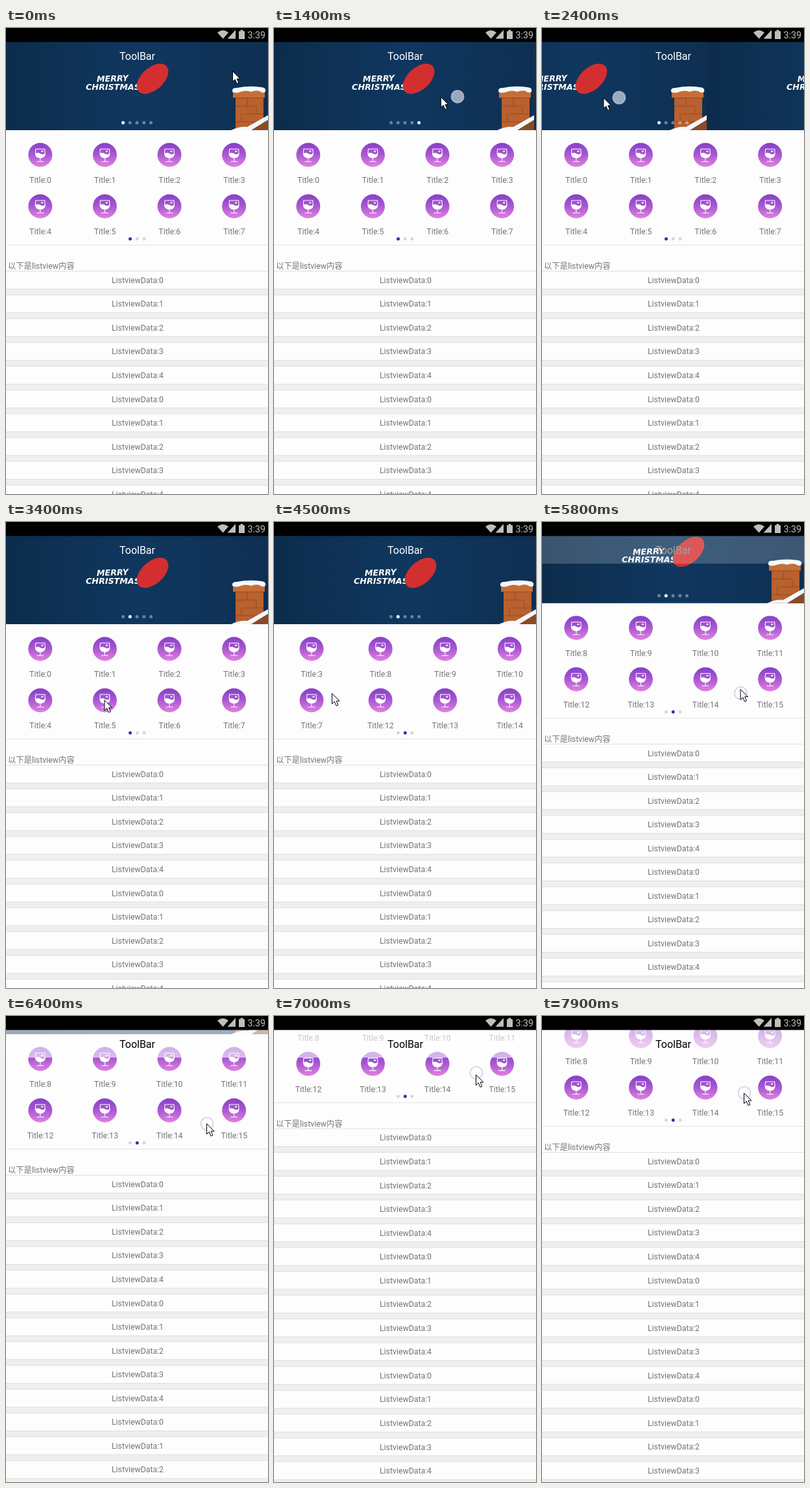
An HTML page that plays this animation: 404x716 px, repeating every 8000 ms.

```html
<!DOCTYPE html>
<html lang="zh">
<head>
<meta charset="utf-8">
<title>ToolBar</title>
<style>
  html, body { margin: 0; width: 100%; height: 100%; overflow: hidden; background: #fdfdfd; }
  svg { display: block; width: 404px; height: 716px; }
  text { font-family: Roboto, "Noto Sans CJK SC", "Noto Sans CJK", sans-serif; font-size: 12.3px; fill: #757575; }
  .mid { text-anchor: middle; }
  .bar { font-size: 16px; }
  .clock { font-size: 14.3px; fill: #bebebe; }
  .greet { font-family: "DejaVu Sans", sans-serif; font-weight: bold; font-style: italic; font-size: 12.7px; fill: #fff; }
</style>
</head>
<body>
<svg viewBox="0 0 404 716">
  <defs>
    <linearGradient id="violet" x2="0" y2="1">
      <stop stop-color="#8640c8"/><stop offset=".45" stop-color="#a555d0"/><stop offset="1" stop-color="#e082e0"/>
    </linearGradient>
    <linearGradient id="night">
      <stop stop-color="#0c2c4c"/><stop offset=".5" stop-color="#10375f"/><stop offset="1" stop-color="#0e2f52"/>
    </linearGradient>
    <g id="icon">
      <circle r="18.5" fill="url(#violet)"/>
      <g fill="none" stroke="#fff" stroke-width="1.1">
        <path d="M-7-9H7L7.5-2Q7 4.500 0 4.500T-7.500-2ZM0 4V10M-5.500 10.300H5.500"/>
        <path d="M-7.500-2Q-4-4.500 0-2T7.500-2.500Q7 4.500 0 4.500Q-7 4.500-7.500-2Z" fill="#fff" stroke="none"/>
        <path d="M1.500-5.500H4.500" stroke-width="2"/>
      </g>
    </g>
    <g id="banner">
      <path d="M0 21H404V157H0Z" fill="url(#night)"/>
      <path d="M404 40Q352 42 350 90" fill="none" stroke="#2a5075" stroke-width=".8" stroke-dasharray="2 3" opacity=".5"/>
      <text class="greet" transform="translate(140 83) rotate(-2)">MERRY</text>
      <text class="greet" x="123" y="94.500">CHRISTMAS</text>
      <ellipse rx="29" ry="17" transform="translate(226 78) rotate(-42)" fill="#d32f30"/>
      <path d="M354 106H397V157H354Z" fill="#b9612f"/>
      <path d="M350 96H399V107H350Z" fill="#c56e38"/>
      <path d="M350 107.500H399M354 120H385M366 132H397M354 144H388M372 108V120M386 120V132M363 132V144M380 144V157" stroke="#7c3a1c" opacity=".6"/>
      <path d="M372 157L404 140V157Z" fill="#8a4a26"/>
      <path d="M347 157Q360 151 372 152L404 134V141L378 157Z" fill="#f4f8fc"/>
      <path d="M349 98Q348 91 356 92Q374 88 394 91Q402 92 400 98Q396 101 391 97Q385 95 378 98Q370 95 362 98Q354 101 349 98Z" fill="#f4f8fc"/>
    </g>
  </defs>

  <path d="M0 0H404V716H0Z" fill="#fdfdfd"/>
  <g id="content">
    <use id="left" href="#banner"/>
    <use id="right" href="#banner"/>
    <g id="bannerDots"></g>
    <g id="grid"></g>
    <g id="gridDots"></g>
    <path d="M0 333.500H404" stroke="#e2e2e2"/>
    <text x="3" y="370">以下是listview内容</text>
    <g id="list"></g>
  </g>

  <path id="veil" d="M0 21H404V64H0Z" fill="#fff"/>
  <text id="heading" class="mid bar" x="202.500" y="48.500">ToolBar</text>

  <path d="M0 0H404V21.500H0Z"/>
  <g fill="#bebebe">
    <path d="M326 7Q334.500 0 343 7L334.500 16.500Z"/>
    <path d="M354 3V16.500H341.500Z"/>
    <path d="M359 5H361.500V3H365.500V5H368V17H359Z"/>
  </g>
  <text class="clock" x="372.500" y="15.500">3:39</text>

  <circle id="touch" r="9.500" fill="#fff" fill-opacity=".58" stroke="#c4c4ee" stroke-opacity=".7" stroke-width="2"/>
  <path id="cursor" d="M.5.5V16.500L4.300 13L7 19.500L9.800 18.300L7.200 12H12Z" fill="#fff" stroke="#000"/>
</svg>
<script>
const LOOP = 8000, STEP = 100, PAGE = 404, GRID_PAGE = 405, SWIPE = 600, LAG = 33;
const $ = id => document.getElementById(id);
const move = (el, x, y) => el.setAttribute("transform", `translate(${x} ${y})`);
const repeat = (n, make) => Array.from({ length: n }, (_, i) => make(i)).join("");

// Smoothstep progress of t between two times
function ease(t, from, to) {
  const k = Math.min(1, Math.max(0, (t - from) / (to - from)));
  return k * k * (3 - 2 * k);
}
const swipe = (t, from) => ease(t, from, from + SWIPE);

// Pager and page positions are sums of eased gestures
const bannerAt = t => PAGE * (swipe(t, 1370) + swipe(t, 2152) - swipe(t, 600));
const gridAt = t => GRID_PAGE * swipe(t, 4107);
const scrollAt = t => 129 * ease(t, 5509, 6400) + 77 * ease(t, 6400, 6900)
  - 54 * ease(t, 6900, 7400) + 12 * ease(t, 7600, 7880);

// Pointer strokes: each eases from the previous resting point
const strokes = [
  { from: 0, to: 300, x: 110, y: 106 },
  { from: 550, to: 1000, x: 345, y: 105, down: true },
  { from: 1000, to: 1200, x: 345, y: 105 },
  { from: 1215, to: 1715, x: 60, y: 107, down: true },
  { from: 1780, to: 2080, x: 290, y: 107 },
  { from: 2100, to: 2497, x: 60, y: 107, down: true },
  { from: 2550, to: 3100, x: 110, y: 275 },
  { from: 3200, to: 4000, x: 375, y: 263 },
  { from: 4100, to: 4500, x: 89, y: 263, down: true },
  { from: 4500, to: 5400, x: 304, y: 297 },
  { from: 5450, to: 6400, x: 309, y: 165, down: true },
  { from: 6400, to: 6900, x: 311, y: 85, down: true },
  { from: 6900, to: 7400, x: 311, y: 131, down: true },
  { from: 7600, to: 7880, x: 311, y: 118, down: true }
];

function pointerAt(t) {
  const p = { x: 349, y: 66, down: false };
  for (const s of strokes) {
    if (t < s.from) break;
    const k = ease(t, s.from, s.to);
    p.x += (s.x - p.x) * k;
    p.y += (s.y - p.y) * k;
    p.down = !!s.down;
  }
  return p;
}

function addDots(id, count, x, y) {
  $(id).innerHTML = repeat(count, i => `<circle cx="${x + i * 10.75}" cy="${y}" r="2.5"/>`);
}

function paintDots(id, active, on, off) {
  [...$(id).children].forEach((dot, i) => dot.setAttribute("fill", i === active ? on : off));
}

function gridCell(i) {
  const x = 52.8 + (i % 4) * 99.6 + Math.floor(i / 8) * GRID_PAGE;
  const y = 195 + (Math.floor(i / 4) % 2) * 79;
  return `<use href="#icon" x="${x}" y="${y}"/><text class="mid" x="${x + 0.2}" y="${y + 43}">Title:${i}</text>`;
}

function listRow(i) {
  const y = 373.5 + i * 36.55;
  return `<path d="M-1 ${y}H405V${y + 27.5}H-1Z" fill="#fdfdfd" stroke="#dedede"/>
    <text class="mid" x="203" y="${y + 18.3}">ListviewData:${i % 5}</text>`;
}

$("grid").innerHTML = repeat(16, gridCell);
$("list").innerHTML = '<path d="M0 374H404V1100H0Z" fill="#efefef"/>' + repeat(20, listRow);
addDots("bannerDots", 5, 180.5, 145.5);
addDots("gridDots", 3, 191.5, 324);

function render(t) {
  const banner = bannerAt(t);
  const shift = (banner + PAGE) % PAGE;
  move($("left"), -shift, 0);
  move($("right"), PAGE - shift, 0);
  paintDots("bannerDots", (Math.round(banner / PAGE) + 5) % 5, "#fff", "rgba(255,255,255,.38)");

  const grid = gridAt(t);
  move($("grid"), -grid, 0);
  paintDots("gridDots", Math.round(grid / GRID_PAGE), "#3a2cb4", "#d6d6de");

  const scroll = scrollAt(t);
  move($("content"), 0, -scroll);
  $("veil").setAttribute("fill-opacity", Math.min(0.6, scroll * 0.006));
  const shade = Math.round(255 * (1 - Math.min(1, scroll / 90)));
  $("heading").style.fill = `rgb(${shade},${shade},${shade})`;

  const pointer = pointerAt(t), finger = pointerAt(t - LAG);
  move($("cursor"), pointer.x, pointer.y);
  move($("touch"), finger.x + 1, finger.y);
  $("touch").style.display = pointer.down ? "" : "none";
}

const start = performance.now();
function tick() {
  const t = (performance.now() - start) % LOOP;
  render(Math.floor(t / STEP) * STEP);
  requestAnimationFrame(tick);
}
tick();
</script>
</body>
</html>
```
